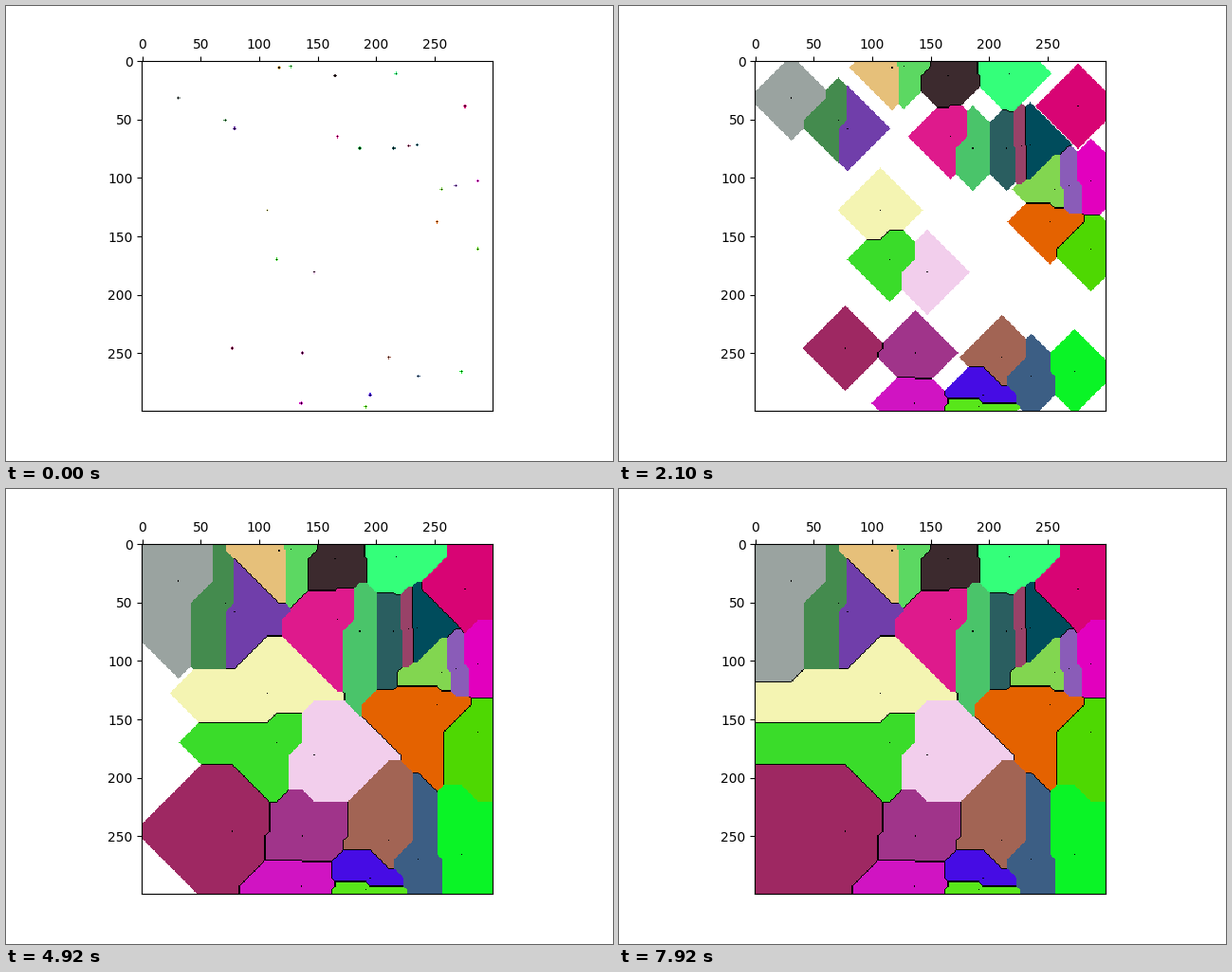
Write a matplotlib script that moves like this. It is 640 px wide and 480 px high and loops after 9 s.

```python
import numpy as np
import matplotlib.pyplot as plt
from matplotlib.animation import FuncAnimation
from matplotlib.colors import to_rgb

SIZE = 300
FRAMES = 150
INTERVAL = 60

# x, y, colour of every growing cell
SEEDS = [
    (31, 32, "#9aa3a0"), (71, 51, "#448b4e"), (79, 58, "#703eaa"),
    (117, 6, "#e6c07a"), (127, 5, "#5cd862"), (165, 13, "#3c2a2e"),
    (217, 11, "#34ff7a"), (276, 39, "#d80474"), (167, 65, "#de1a8c"),
    (186, 75, "#4ac46a"), (215, 75, "#2a5e60"), (228, 73, "#984268"),
    (235, 72, "#004c5c"), (256, 110, "#82d650"), (268, 107, "#8a5cb8"),
    (287, 103, "#e200be"), (107, 128, "#f4f4b2"), (252, 138, "#e46200"),
    (287, 161, "#4ed802"), (115, 170, "#3adc2a"), (147, 181, "#f2ceec"),
    (77, 246, "#9e2862"), (137, 250, "#a0348a"), (136, 293, "#d014c2"),
    (211, 254, "#a26454"), (236, 270, "#3c5e84"), (273, 266, "#0af426"),
    (195, 286, "#460ce4"), (191, 296, "#58e61a"),
]


def build_cells():
    """Return the distance to the nearest seed and the finished picture."""
    ys, xs = np.mgrid[:SIZE, :SIZE]
    dist = np.array([abs(xs - x) + abs(ys - y) for x, y, _ in SEEDS])
    near = dist.min(axis=0)
    colors = np.array([to_rgb(c) for _, _, c in SEEDS])
    picture = colors[dist.argmin(axis=0)]
    tied = (dist == near).sum(axis=0) > 1
    picture[tied | (near == 0)] = 0
    return near, picture


near, picture = build_cells()


def grown(radius):
    return np.where((near <= radius)[..., None], picture, 1.0)


fig, ax = plt.subplots(figsize=(6.4, 4.8), dpi=100)
image = ax.matshow(grown(1))
ax.xaxis.tick_top()


def update(frame):
    image.set_data(grown(frame + 1))
    return [image]


anim = FuncAnimation(fig, update, frames=FRAMES, interval=INTERVAL,
                     repeat=True, repeat_delay=0)
plt.show()
```
